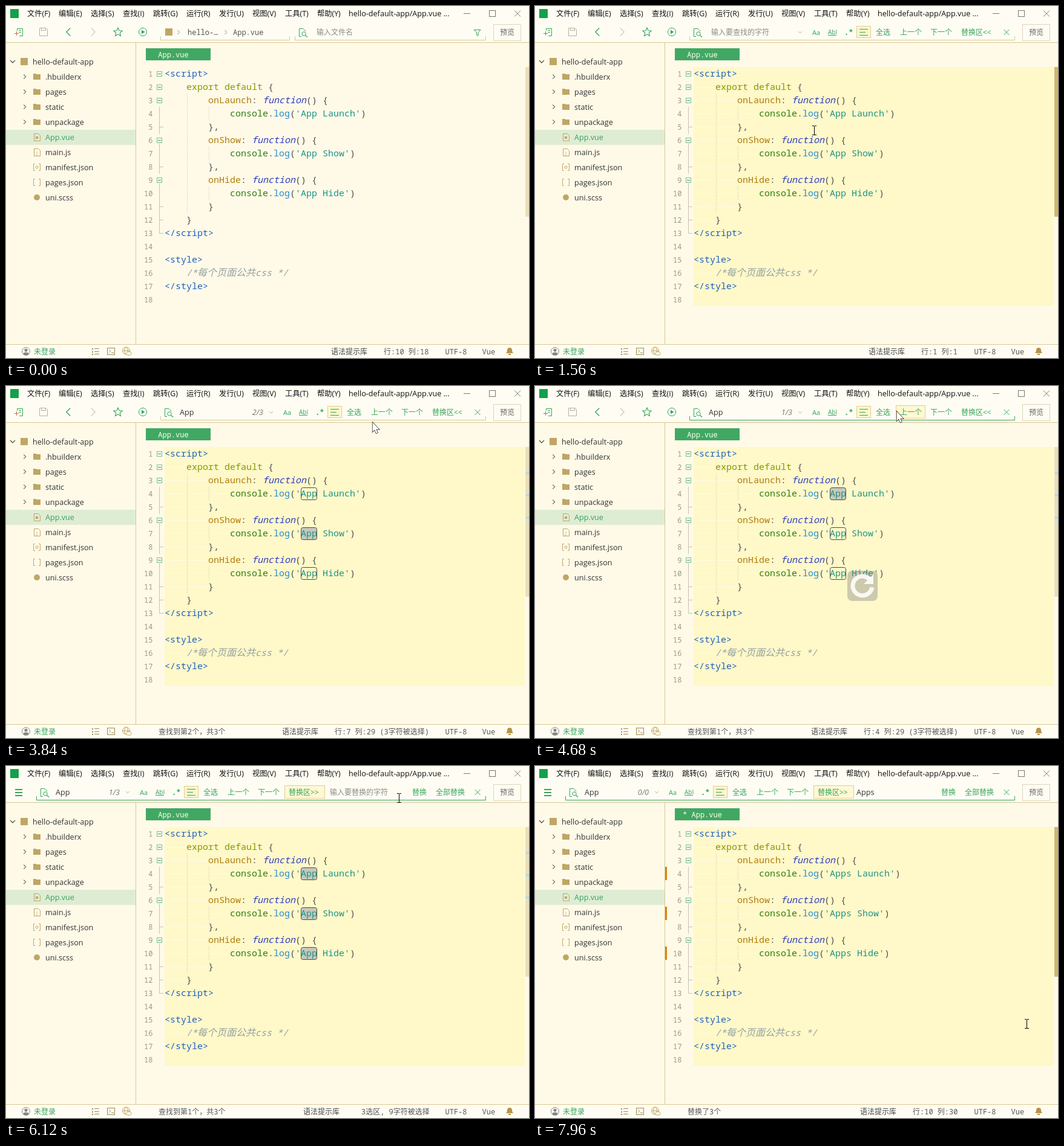
An HTML page with a canvas that plays this animation: 864 px wide and 583 px high, repeating every 8000 ms.

```html
<!DOCTYPE html>
<html lang="zh-CN">
<head>
<meta charset="utf-8">
<title>Find and replace</title>
<style>
html, body { margin: 0; width: 100%; height: 100%; overflow: hidden; background: #fffae8; }
canvas { display: block; }
</style>
</head>
<body>
<canvas id="stage" width="864" height="583"></canvas>
<script>
const g = document.getElementById('stage').getContext('2d');
const LOOP = 8000;
const CJK = '"Noto Sans CJK SC","Noto Sans CJK JP","Noto Sans CJK"';
const SANS = `"Open Sans","Noto Sans",${CJK},sans-serif`;
const MONO = `"Noto Sans Mono",${CJK},monospace`;
const UI = '12.6px ' + SANS, SMALL = '12px ' + SANS, FIXED = '12px ' + MONO, CODE = '15px ' + MONO;
const GREEN = '#35a45b', TAN = '#bfa665', EDGE = '#d8c892', INK = '#333', GREY = '#8c8c84';
const TOP = '#fffdf3', BG = '#fffae8';
const P = '#505050', TAG = '#1f60c4', KEY = '#859900', PROP = '#b07d0a', FN = '#2e3fc0';
const OBJ = '#2f7d0b', CALL = '#268bd2', STR = '#1f9488', NOTE = '#93a1a1';

// Event times in ms
const T = { select: 640, find: 1200, typeA: 2720, match: 3040, second: 3560, third: 4160, wrap: 4440,
  allStatus: 5080, all: 5200, panel: 5600, typeB: 6280, replace: 7200, bars: 7720 };

const pointer = [
  [240, 870, 300], [600, 493, 427], [1240, 493, 427], [1720, 450, 130], [2080, 425, 52], [2400, 408, 67],
  [3480, 408, 67], [3800, 605, 60], [3860, 605, 60], [4080, 668, 42], [4540, 668, 42], [4680, 597, 42],
  [4860, 574, 42], [5160, 574, 42], [5480, 728, 42], [5620, 728, 42], [5880, 655, 48], [6120, 649, 53],
  [6480, 649, 48], [6760, 684, 42], [6880, 684, 42], [7060, 735, 42], [7700, 735, 42], [7920, 812, 427]
];

function pointerAt(t) {
  if (t < pointer[0][0]) return { x: -50, y: -50 };
  for (let i = 1; i < pointer.length; i++) {
    const [t0, x0, y0] = pointer[i - 1], [t1, x1, y1] = pointer[i];
    if (t < t1) {
      const u = (t - t0) / (t1 - t0), e = u * u * (3 - 2 * u);
      return { x: x0 + (x1 - x0) * e, y: y0 + (y1 - y0) * e };
    }
  }
  const [, x, y] = pointer[pointer.length - 1];
  return { x, y };
}

function text(s, x, y, color, font = SMALL, align = 'left') {
  g.font = font;
  g.textAlign = align;
  g.fillStyle = color;
  g.fillText(s, x, y);
}
function rect(x, y, w, h, color) {
  g.fillStyle = color;
  g.fillRect(x, y, w, h);
}
function frame(x, y, w, h, color, fill) {
  if (fill) rect(x, y, w, h, fill);
  g.strokeStyle = color;
  g.lineWidth = 1;
  g.strokeRect(x + .5, y + .5, w - 1, h - 1);
}
function line(color, pts, width = 1, closed = false) {
  g.beginPath();
  for (let i = 0; i < pts.length; i += 2) g.lineTo(pts[i], pts[i + 1]);
  if (closed) g.closePath();
  g.strokeStyle = color;
  g.lineWidth = width;
  g.stroke();
}
function circle(x, y, r, color, filled) {
  g.beginPath();
  g.arc(x, y, r, 0, 7);
  g.fillStyle = g.strokeStyle = color;
  g.lineWidth = 1;
  filled ? g.fill() : g.stroke();
}
function chevron(x, y, color, size = 4, turn = 0, width = 1) {
  g.save();
  g.translate(x, y);
  g.rotate(turn);
  line(color, [-size / 2, -size, size / 2, 0, -size / 2, size], width);
  g.restore();
}
function cross(x, y, r, color) {
  line(color, [x - r, y - r, x + r, y + r]);
  line(color, [x + r, y - r, x - r, y + r]);
}
function page(x, y, color) {
  line(color, [x + .5, y + .5, x + 7.5, y + .5, x + 10.5, y + 3.5, x + 10.5, y + 12.5, x + .5, y + 12.5], 1, true);
}

// Title bar
function drawTitle() {
  rect(0, 0, 864, 60, TOP);
  rect(7, 5, 14, 15, '#12a04c');
  const menu = ['文件(F)', 35, '编辑(E)', 87, '选择(S)', 140, '查找(I)', 193, '跳转(G)', 243, '运行(R)', 298,
    '发行(U)', 352, '视图(V)', 407, '工具(T)', 461, '帮助(Y)', 514];
  for (let i = 0; i < menu.length; i += 2) text(menu[i], menu[i + 1], 17, '#111', '12.3px ' + SANS);
  text('hello-default-app/App.vue ...', 566, 17, '#111', UI);
  line('#777', [756, 12.5, 767, 12.5]);
  frame(798, 7, 11, 11, '#777');
  cross(845, 12.5, 5, '#777');
  rect(0, 60, 864, 1, EDGE);
  frame(805, 30, 46, 28, '#dcd5bd', TOP);
  text('预览', 816, 48, '#666');
}

function bracket(x0, x1, color) {
  line(color, [x0 + .5, 50, x0 + .5, 56.5, x1 - .5, 56.5, x1 - .5, 50]);
}
function searchIcon(x) {
  line(GREEN, [x + 4, 50.5, x + .5, 50.5, x + .5, 37.5, x + 7, 37.5, x + 10.5, 41, x + 10.5, 42]);
  circle(x + 8, 46, 3.2, GREEN);
  line(GREEN, [x + 10.5, 48.5, x + 14, 51.5], 1.3);
}

function drawToolIcons() {
  line(GREEN, [18.5, 41, 18.5, 37.5, 27.5, 37.5, 27.5, 49.5, 22, 49.5]);
  line(GREEN, [21, 40.5, 25, 40.5]);
  line(GREEN, [21, 43.5, 25, 43.5]);
  line('#d0653c', [14, 45.5, 21, 45.5]);
  line('#d0653c', [17.5, 42, 17.5, 49]);
  line('#b5b19c', [55.5, 36.5, 66, 36.5, 68.5, 39, 68.5, 49.5, 55.5, 49.5], 1, true);
  frame(58, 36, 8, 5, '#b5b19c');
  chevron(103, 43, GREEN, 6.5, Math.PI, 1.3);
  chevron(144, 43, '#cfcbb9', 6.5, 0, 1.2);
  const star = [];
  for (let i = 0; i < 10; i++) {
    const r = i % 2 ? 3.4 : 7.5, a = i * Math.PI / 5 - Math.PI / 2;
    star.push(185 + r * Math.cos(a), 43.5 + r * Math.sin(a));
  }
  line(GREEN, star, 1.1, true);
  circle(226, 43, 6.6, GREEN);
  g.beginPath();
  g.moveTo(224, 39.8); g.lineTo(229.5, 43); g.lineTo(224, 46.2);
  g.fill();
}

function drawBreadcrumb() {
  bracket(255, 469, EDGE);
  rect(263, 37, 12, 12, TAN);
  chevron(285, 43.5, GREY, 3.5);
  text('hello-…', 300, 48, '#555', FIXED);
  chevron(363, 43.5, GREY, 3.5);
  text('App.vue', 375, 48, '#555', FIXED);
  bracket(477, 793, EDGE);
  searchIcon(484);
  text('输入文件名', 513, 48, GREY);
  line(GREEN, [773, 39.5, 784, 39.5, 780, 44, 780, 49.5, 777.5, 48, 777.5, 44], 1, true);
}

function button(label, x, w, p, active) {
  const hover = p.x >= x && p.x < x + w && p.y >= 32 && p.y < 54;
  if (hover || active) frame(x, 32, w, 22, '#dfcf8c', '#fff8d2');
  text(label, x + 7, 48, GREEN);
}

function drawFindBar(s) {
  const { p, panel } = s;
  const x0 = panel ? 50 : 255, dx = panel ? -237 : 0;
  const over = p.x > x0 && p.x < 793 && p.y > 30 && p.y < 57;
  bracket(x0, 793, over || panel ? GREEN : EDGE);
  searchIcon(x0 + 7);
  if (s.query) text(s.query, x0 + 32, 48, INK, UI);
  else text('输入要查找的字符', x0 + 36, 48, GREY);
  if (s.count) text(s.count, 425 + dx, 48, '#777', 'italic ' + UI, 'right');
  chevron(438 + dx, 43.5, '#bbb7a2', 3, Math.PI / 2);
  text('Aa', 458 + dx, 48, GREEN, '11px ' + SANS);
  text('AbI', 484 + dx, 47, GREEN, '10px ' + SANS);
  rect(484 + dx, 48, 14, 1, GREEN);
  text('.*', 511 + dx, 48, GREEN, 'bold 12px ' + MONO);
  frame(531 + dx, 33, 24, 20, '#dfcf8c', '#fff6cd');
  [[38, 14], [43, 10], [48, 14]].forEach(([y, w]) => rect(536 + dx, y, w, 1, GREEN));
  button('全选', 556 + dx, 38, p);
  button('上一个', 596 + dx, 49, p);
  button('下一个', 646 + dx, 50, p);
  button(panel ? '替换区>>' : '替换区<<', 697 + dx, 67, p, panel);
  cross(779, 43.5, 4.5, GREEN);
  if (!panel) return;
  if (s.swap) text(s.swap, 531, 48, INK, UI);
  else text('输入要替换的字符', 535, 48, GREY);
  button('替换', 664, 38, p);
  button('全部替换', 703, 62, p);
}

// Project tree
function drawTree() {
  rect(0, 205, 214, 25, '#dfecd4');
  chevron(11, 92, '#555', 4, Math.PI / 2, 1.3);
  rect(24, 86, 12, 12, TAN);
  text('hello-default-app', 44, 97, INK, UI);
  ['.hbuilderx', 'pages', 'static', 'unpackage', 'App.vue', 'main.js', 'manifest.json', 'pages.json', 'uni.scss']
    .forEach((name, i) => {
      const y = 117 + 25 * i;
      text(name, 65, y + 5, i === 4 ? GREEN : INK, UI);
      if (i < 4) {
        chevron(31, y, '#777', 3.5, 0, 1.2);
        rect(45, y - 5, 5, 2, TAN);
        rect(45, y - 4, 12, 9, TAN);
      } else if (i < 6) {
        page(46, y - 6, TAN);
        if (i === 4) rect(49, y - 1, 4, 4, TAN);
        else text('J', 50, y + 4, TAN, '8px ' + SANS);
      } else if (i < 8) {
        line(TAN, [48, y - 5.5, 45.5, y - 5.5, 45.5, y + 5.5, 48, y + 5.5]);
        line(TAN, [54, y - 5.5, 56.5, y - 5.5, 56.5, y + 5.5, 54, y + 5.5]);
        if (i === 6) circle(51, y, 2, TAN);
      } else circle(51, y, 5, TAN, true);
    });
  rect(214, 61, 1, 499, EDGE);
}

// Code: each row is [tab count, [text, colour, italic]...]
const handler = name => [2, [name, PROP], [':', P], [' function', FN, true], ['() {', P]];
const log = s => [3, ['console', OBJ], ['.', P], ['log', CALL], ['(', P], [`'${s}'`, STR], [')', P]];
const codeRows = word => [
  [0, ['<script>', TAG]],
  [1, ['export default', KEY], [' {', P]],
  handler('onLaunch'), log(word + ' Launch'), [2, ['},', P]],
  handler('onShow'), log(word + ' Show'), [2, ['},', P]],
  handler('onHide'), log(word + ' Hide'), [2, ['}', P]],
  [1, ['}', P]],
  [0, ['<\/script>', TAG]],
  [0],
  [0, ['<style>', TAG]],
  [1, ['/*', NOTE, true], ['每个页面公共', NOTE, true], ['css */', NOTE, true]],
  [0, ['</style>', TAG]],
  [0]
];
const isWide = s => s.charCodeAt(0) > 255;
const widthOf = s => s.length * (isWide(s) ? 16 : 9);
const midOf = row => 112 + 22 * (row - 1);

function drawFolds() {
  const c = '#c8c4b0';
  [[167, 212], [228, 278], [294, 376]].forEach(([a, b]) => rect(253, a, 1, b - a, c));
  [5, 8, 11, 12, 13].forEach(r => rect(253, midOf(r), 7, 1, c));
  [1, 2, 3, 6, 9].forEach(r => {
    const y = midOf(r);
    frame(249, y - 4, 9, 9, '#7fbd93', BG);
    rect(251, y, 5, 1, '#35a45b');
  });
  g.setLineDash([1, 2]);
  line('#c5c0a8', [299.5, 146, 299.5, 343]);
  [4, 7, 10].forEach(r => line('#c5c0a8', [335.5, midOf(r) - 11, 335.5, midOf(r) + 11]));
  g.setLineDash([]);
}

function drawMatches(s) {
  [4, 7, 10].forEach((r, i) => {
    const y = midOf(r) - 10;
    g.beginPath();
    g.roundRect(487.5, y + .5, 26, 20, 3);
    if (s.all || s.current === i) {
      g.fillStyle = '#c8c8bb';
      g.fill();
    }
    g.strokeStyle = '#4a4a44';
    g.lineWidth = 1;
    g.stroke();
    rect(859, 142 + 37 * i, 5, 4, '#b5d9ef');
  });
}

function drawEditor(s) {
  rect(231, 70, 107, 20, '#41a863');
  text((s.done ? '* ' : '') + 'App.vue', 276.5, 85, '#fffdf0', FIXED, 'center');
  if (s.find) rect(262, 101, 595, 396, '#fff8c9');
  const rows = codeRows(s.done ? 'Apps' : 'App');
  if (s.selected) rows.forEach(([tabs, ...parts], i) => {
    if (i > 16) return;
    const w = parts.reduce((sum, [str]) => sum + widthOf(str), tabs * 36 + 9);
    rect(262, 101 + 22 * i, w, 22, '#bfd78f');
  });
  drawFolds();
  rect(858, 101, 6, 248, s.p.y > 100 ? '#d0b66c' : '#ebdfb9');
  if (s.selected) rect(859, 105, 5, 4, '#35b064');
  if (s.matched) drawMatches(s);
  rows.forEach(([tabs, ...parts], i) => {
    const y = midOf(i + 1);
    text(i + 1, 242.5, y + 5, '#9b9784', FIXED, 'right');
    if (s.selected || s.find)
      for (let k = 0; k < tabs; k++)
        rect(265 + 36 * k, y, 32, 1, s.selected ? '#f7f8e6' : 'rgba(255,255,255,.55)');
    let x = 262 + tabs * 36;
    for (const [str, color, italic] of parts) {
      const font = isWide(str) ? '16px ' + SANS : CODE;
      text(str, x, y + 5, color, (italic ? 'italic ' : '') + font);
      if (s.selected)
        [...str].forEach((ch, k) => { if (ch === ' ') rect(x + 9 * k + 4, y, 2, 2, '#f7f8e6'); });
      x += widthOf(str);
    }
  });
  if (s.bars) [4, 7, 10].forEach(r => rect(215, midOf(r) - 11, 3, 22, '#d9820f'));
}

function drawWrapBadge(fade) {
  if (fade <= 0) return;
  g.save();
  g.globalAlpha = fade * .6;
  g.beginPath();
  g.roundRect(516, 306, 50, 50, 8);
  g.fillStyle = '#787878';
  g.fill();
  g.globalAlpha = Math.min(1, fade * 1.4);
  g.beginPath();
  g.arc(541, 331, 16, .15, 5.5);
  g.strokeStyle = g.fillStyle = '#fff';
  g.lineWidth = 7;
  g.stroke();
  g.beginPath();
  g.moveTo(559, 312); g.lineTo(559, 328); g.lineTo(543, 328);
  g.fill();
  g.restore();
}

function drawStatus(s) {
  rect(0, 560, 864, 23, TOP);
  rect(0, 560, 864, 1, EDGE);
  circle(33, 572, 6.5, '#888');
  circle(33, 570, 2.6, '#888', true);
  g.beginPath();
  g.ellipse(33, 576, 4.5, 2.5, 0, 0, 7);
  g.fill();
  text('未登录', 46, 577, GREEN);
  [567, 572, 576].forEach(y => {
    rect(142, y, 2, 2, '#9a8a55');
    rect(146, y, 8, 1, '#9a8a55');
  });
  frame(167, 566, 13, 12, '#9a8a55');
  chevron(171.5, 571.5, '#9a8a55', 2.5);
  rect(174, 574, 4, 1, '#9a8a55');
  circle(198.5, 571, 6, TAN);
  line(TAN, [192.5, 571, 204.5, 571]);
  g.beginPath();
  g.ellipse(198.5, 571, 2.8, 6, 0, 0, 7);
  g.stroke();
  g.beginPath();
  g.ellipse(203, 575.5, 4.5, 2.8, 0, 0, 7);
  g.fillStyle = TOP;
  g.fill();
  g.stroke();
  text(s.message, 252, 577, '#555', FIXED);
  const [hintX, posX, pos] = s.place;
  text('语法提示库', hintX, 577, '#444');
  text(pos, posX, 577, '#555', FIXED);
  text('UTF-8', 725.5, 577, '#555', FIXED);
  text('Vue', 786.5, 577, '#555', FIXED);
  g.beginPath();
  g.moveTo(826, 575);
  g.quadraticCurveTo(828, 573, 828, 570);
  g.arc(832, 570, 4, Math.PI, 0);
  g.quadraticCurveTo(836, 573, 838, 575);
  g.fillStyle = '#b8924a';
  g.fill();
  rect(830, 576, 4, 2, '#b8924a');
}

function drawPointer(s) {
  const { x, y } = s.p;
  const inField = y < 57 && (s.panel ? x > 530 && x < 664 : s.find && x > 282 && x < 430);
  g.save();
  g.translate(Math.round(x), Math.round(y));
  if (y > 100 || inField) {
    rect(0, -7, 1, 15, '#000');
    [-8, 7].forEach(v => {
      rect(-3, v, 3, 1, '#000');
      rect(1, v, 3, 1, '#000');
    });
  } else {
    const shape = [.5, 0, .5, 16, 4, 12.5, 6.5, 18.5, 9, 17.5, 6.5, 11.8, 11.5, 11.8];
    line('#000', shape, 1.2, true);
    g.fillStyle = '#fff';
    g.fill();
  }
  g.restore();
}

function placeAt(t) {
  if (t < T.select) return [537, 624, '行:10 列:18'];
  if (t < T.find) return [482, 579, '18行, 258字符被选择'];
  if (t < T.match) return [551, 638, '行:1 列:1'];
  if (t >= T.replace) return [537, 624, '行:10 列:30'];
  if (t >= T.allStatus) return [491, 587, '3选区, 9字符被选择'];
  const row = [4, 7, 10][matchAt(t)], x = row > 9 ? 536 : 543;
  return [x - 87, x, `行:${row} 列:29 (3字符被选择)`];
}
function matchAt(t) {
  return t < T.second || t >= T.wrap ? 0 : t < T.third ? 1 : 2;
}
const typed = (word, t, start, step) => word.slice(0, Math.max(0, Math.floor((t - start) / step) + 1));

function stateAt(t) {
  const done = t >= T.replace, current = matchAt(t), found = t >= T.match;
  return {
    p: pointerAt(t), done, current,
    selected: t >= T.select && t < T.find,
    find: t >= T.find,
    matched: found && !done,
    all: t >= T.all,
    panel: t >= T.panel,
    bars: t >= T.bars,
    query: typed('App', t, T.typeA, 160),
    swap: typed('Apps', t, T.typeB, 120),
    count: done ? '0/0' : found ? `${current + 1}/3` : '',
    message: done ? '替换了3个' : found ? `查找到第${current + 1}个，共3个` : '',
    place: placeAt(t),
    wrap: t >= T.wrap ? 1 - (t - T.wrap) / 640 : 0
  };
}

function draw(t) {
  const s = stateAt(t);
  rect(0, 0, 864, 583, BG);
  drawTitle();
  if (s.panel) [38, 43, 48].forEach(y => rect(15, y, 12, 2, GREEN));
  else drawToolIcons();
  s.find ? drawFindBar(s) : drawBreadcrumb();
  drawTree();
  drawEditor(s);
  drawWrapBadge(s.wrap);
  drawStatus(s);
  drawPointer(s);
}

function tick() {
  draw(performance.now() % LOOP);
  requestAnimationFrame(tick);
}
tick();
</script>
</body>
</html>
```
